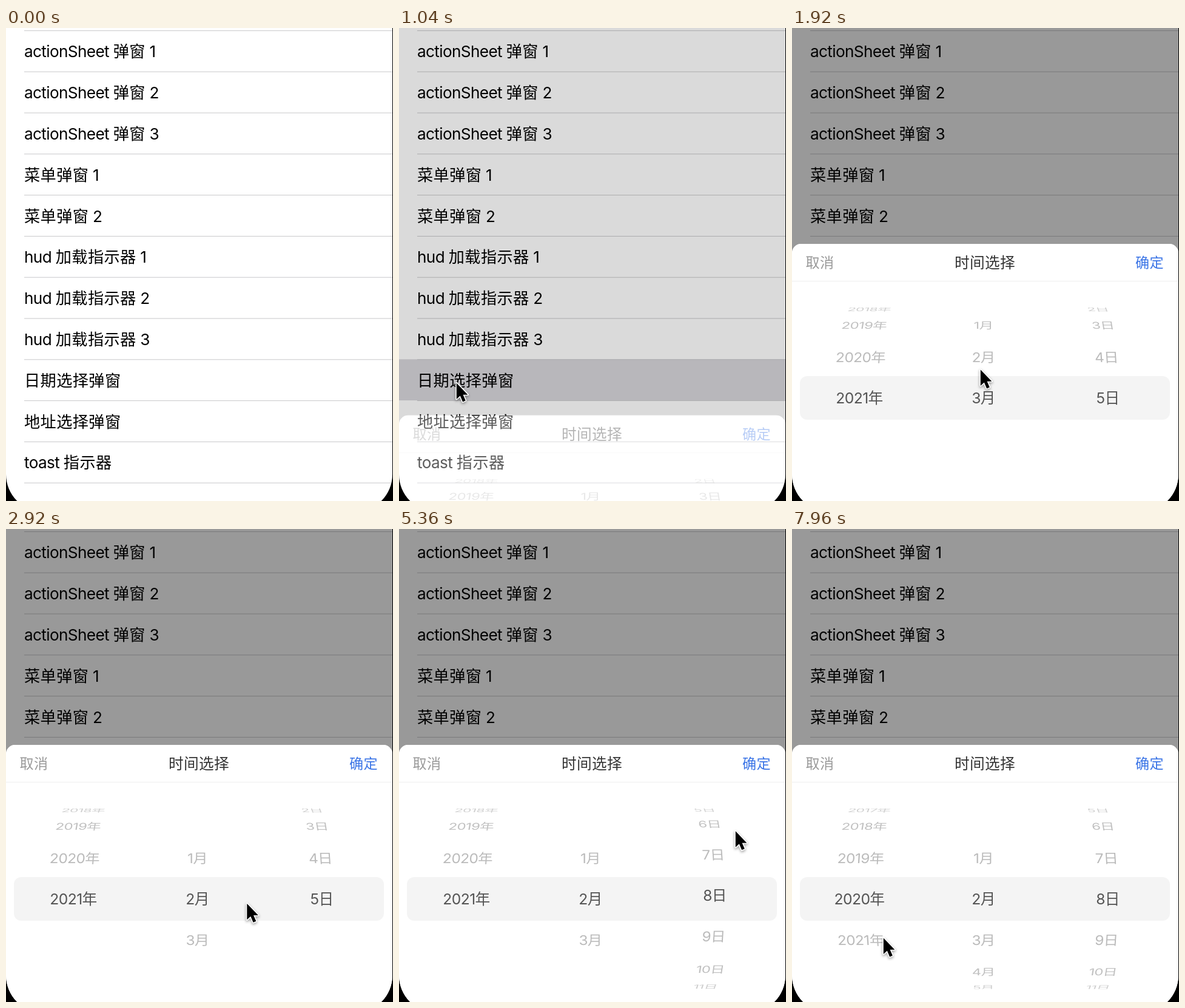
An HTML page with a canvas that plays this animation: 638 px wide and 780 px high, repeating every 8000 ms.

```html
<!DOCTYPE html>
<html lang="zh-CN">
<head>
<meta charset="utf-8">
<title>日期选择弹窗</title>
<style>
  html, body { margin: 0; width: 100%; height: 100%; overflow: hidden; background: #000; }
  canvas { display: block; }
</style>
</head>
<body>
<canvas id="stage" width="638" height="780"></canvas>
<script>
const ctx = document.getElementById('stage').getContext('2d');
const LOOP = 8000, STEP = 40;
const STAGE = [0, 0, 638, 780];
const PHONE = { right: 637, bottom: 798, radius: 62 };
const ROW = 67.8, FIRST_LINE = 3.9, PRESSED_ROW = 8;
const SHEET_TOP = 356;
const WHEEL = { y: 610, radius: 147.3, angle: 0.476, top: 461, bottom: 758.5, perspective: 0.093 };
const BAND = { x: 13, y: 574, w: 610, h: 72 };
const SETTLE = 200, REFRESH = 360;

const LATIN = 'Inter, "Liberation Sans", sans-serif';
const HAN = '"Noto Sans CJK SC", "Noto Sans CJK", sans-serif';

const numbered = (name, count) => Array.from({ length: count }, (_, i) => `${name} ${i + 1}`);
const ROWS = [
  ...numbered('actionSheet 弹窗', 3),
  ...numbered('菜单弹窗', 2),
  ...numbered('hud 加载指示器', 3),
  '日期选择弹窗', '地址选择弹窗', 'toast 指示器'
];

// Where the pointer rests; a drag there turns a wheel by some rows.
const STOPS = [
  { arrive: 40, leave: 40, x: 180, y: 42 },
  { arrive: 720, leave: 1400, x: 94, y: 584, bow: [-170, 130] },
  { arrive: 1760, leave: 2640, x: 310, y: 562, wheel: 'month', drag: [1920, 2360], rows: -0.83 },
  { arrive: 3440, leave: 4080, x: 552, y: 624, bow: [187, -45], wheel: 'day', drag: [3640, 3920], rows: 2.02 },
  { arrive: 4440, leave: 5400, x: 554, y: 573, wheel: 'day', drag: [4600, 5360], rows: 1.085 },
  { arrive: 5640, leave: 6080, x: 298, y: 568 },
  { arrive: 6480, leave: 6680, x: 163, y: 611 },
  { arrive: 6840, leave: 7400, x: 150, y: 594, wheel: 'year', drag: [7040, 7240], rows: -0.93 },
  { arrive: 7720, leave: LOOP, x: 150, y: 673 }
];
const INITIAL = { year: 2021, month: 3, day: 5 };

const clamp01 = v => Math.max(0, Math.min(1, v));
const mix = (a, b, k) => a + (b - a) * k;
const progress = (t, from, to) => clamp01((t - from) / (to - from));
const easeInOut = k => (1 - Math.cos(Math.PI * k)) / 2;
const ease = (t, from, to) => easeInOut(progress(t, from, to));

const draggedRows = (stop, t) => stop.drag ? stop.rows * ease(t, ...stop.drag) : 0;

function wheelValue(wheel, t) {
  let value = INITIAL[wheel];
  for (const stop of STOPS.filter(s => s.wheel === wheel)) {
    value += draggedRows(stop, t);
    value = mix(value, Math.round(value), ease(t, stop.leave, stop.leave + SETTLE));
  }
  return value;
}

// Choosing in one wheel refreshes the range of the next.
const refreshed = (wheel, t) => t >= STOPS.find(s => s.wheel === wheel).leave + REFRESH;

function pointerAt(t) {
  let i = STOPS.length - 1;
  while (i > 1 && t < STOPS[i - 1].leave) i--;
  const a = STOPS[i - 1], b = STOPS[i];
  const [bowX, bowY] = b.bow || [0, 0];
  const k = progress(t, a.leave, b.arrive);
  const swing = k * k * Math.sin(Math.PI * k);
  const pull = stop => stop.y - draggedRows(stop, t) * WHEEL.radius * WHEEL.angle;
  return {
    x: mix(a.x, b.x, easeInOut(k)) + bowX * swing,
    y: mix(pull(a), pull(b), easeInOut(k)) + bowY * swing
  };
}

// Draws mixed Latin and Han runs, vertically centred on y.
function drawText(text, x, y, size, color, align = 0) {
  const runs = text.match(/[\u4e00-\u9fff]+|[^\u4e00-\u9fff]+/g).map(part => {
    const han = /[\u4e00-\u9fff]/.test(part);
    return {
      part,
      font: `${size}px ${han ? HAN : LATIN}`,
      spacing: `${size * (han ? 0.015 : -0.025)}px`
    };
  });
  const use = run => { ctx.font = run.font; ctx.letterSpacing = run.spacing; };
  let total = 0;
  for (const run of runs) {
    use(run);
    run.width = ctx.measureText(run.part).width;
    total += run.width;
  }
  x -= total * align;
  ctx.fillStyle = color;
  for (const run of runs) {
    use(run);
    ctx.fillText(run.part, x, y + size * 0.365);
    x += run.width;
  }
}

function drawList(t, shown) {
  ctx.fillStyle = '#fff';
  ctx.fillRect(...STAGE);
  if (t >= 920 && shown < 1) {
    ctx.fillStyle = `rgba(212,211,216,${1 - 0.6 * shown * shown})`;
    ctx.fillRect(0, FIRST_LINE + PRESSED_ROW * ROW, 638, ROW);
  }
  for (let i = 0; i <= ROWS.length; i++) {
    const y = FIRST_LINE + i * ROW;
    ctx.fillStyle = '#c8c8ca';
    ctx.fillRect(30, y, 608, 1);
    if (ROWS[i]) drawText(ROWS[i], 30, y + 35, 26.2, '#000');
  }
}

function drawWheel(offset, value, max, unit, color) {
  const { y, radius, angle, perspective } = WHEEL;
  const nearest = Math.round(value);
  for (let n = Math.max(1, nearest - 3); n <= Math.min(max, nearest + 3); n++) {
    const phi = (n - value) * angle;
    if (Math.abs(phi) > Math.PI / 2) continue;
    const depth = 1 - Math.cos(phi);
    const scale = 1 - perspective * depth;
    const squash = Math.cos(phi) + 0.28 * depth * depth;
    const shear = -offset * perspective * Math.sin(phi) / radius;
    ctx.save();
    ctx.globalAlpha *= 1 - 0.4 * depth * depth;
    ctx.transform(scale, 0, shear, squash, 318 + offset * scale, y + radius * Math.sin(phi));
    drawText(n + unit, 0, 0, 24.7, color, 0.5);
    ctx.restore();
  }
}

function drawWheels(t, color, ...areas) {
  ctx.save();
  ctx.beginPath();
  for (const [top, bottom] of areas) ctx.rect(0, top, 638, bottom - top);
  ctx.clip();
  drawWheel(-206.5, wheelValue('year', t), 2021, '年', color);
  drawWheel(-2, wheelValue('month', t), refreshed('year', t) ? 12 : 3, '月', color);
  drawWheel(203, wheelValue('day', t), refreshed('month', t) ? 28 : 5, '日', color);
  ctx.restore();
}

function drawSheet(t, shown) {
  if (!shown) return;
  const shift = (PHONE.bottom - SHEET_TOP) * (1 - shown);
  const sheet = [0, SHEET_TOP + shift, PHONE.right, 500, 15];

  // The dimming leaves out the area under the sheet.
  ctx.beginPath();
  ctx.rect(...STAGE);
  ctx.roundRect(...sheet);
  ctx.fillStyle = `rgba(0,0,0,${0.4 * shown})`;
  ctx.fill('evenodd');

  ctx.save();
  ctx.globalAlpha = shown;
  ctx.beginPath();
  ctx.roundRect(...sheet);
  ctx.fillStyle = '#fff';
  ctx.fill();

  ctx.translate(0, shift);
  drawText('取消', 22.5, 387, 23.1, '#999');
  drawText('时间选择', 318, 387, 24.7, '#333', 0.5);
  drawText('确定', 613, 387, 23.1, '#3a74e6', 1);
  ctx.fillStyle = '#eee';
  ctx.fillRect(0, 417, 638, 1);

  ctx.beginPath();
  ctx.roundRect(BAND.x, BAND.y, BAND.w, BAND.h, 12);
  ctx.fillStyle = 'rgba(0,0,0,0.044)';
  ctx.fill();

  const bandEnd = BAND.y + BAND.h;
  drawWheels(t, '#555', [BAND.y, bandEnd]);
  drawWheels(t, '#bbb', [WHEEL.top, BAND.y], [bandEnd, WHEEL.bottom]);
  ctx.restore();
}

function drawPointer(t) {
  if (t < STOPS[0].arrive) return;
  const { x, y } = pointerAt(t);
  ctx.save();
  ctx.translate(x + 0.8, y + 1.4);
  ctx.lineJoin = 'round';
  ctx.lineWidth = 3.2;
  ctx.strokeStyle = '#fff';
  ctx.shadowColor = 'rgba(0,0,0,0.4)';
  ctx.shadowBlur = 4;
  ctx.shadowOffsetY = 2;
  const arrow = new Path2D('M0 0V26.5L6 21L10.3 31L15 29L10.8 19.3H18.6Z');
  ctx.stroke(arrow);
  ctx.shadowColor = 'transparent';
  ctx.fillStyle = '#000';
  ctx.fill(arrow);
  ctx.restore();
}

function render(t) {
  const shown = ease(t, 931, 1197);
  ctx.fillStyle = '#000';
  ctx.fillRect(...STAGE);
  ctx.save();
  ctx.beginPath();
  ctx.roundRect(0, -100, PHONE.right, PHONE.bottom + 100, PHONE.radius);
  ctx.clip();
  drawList(t, shown);
  drawSheet(t, shown);
  ctx.restore();
  drawPointer(t);
}

const start = performance.now();
function tick() {
  const t = (performance.now() - start) % LOOP;
  render(Math.floor(t / STEP) * STEP);
  requestAnimationFrame(tick);
}
tick();
</script>
</body>
</html>
```
